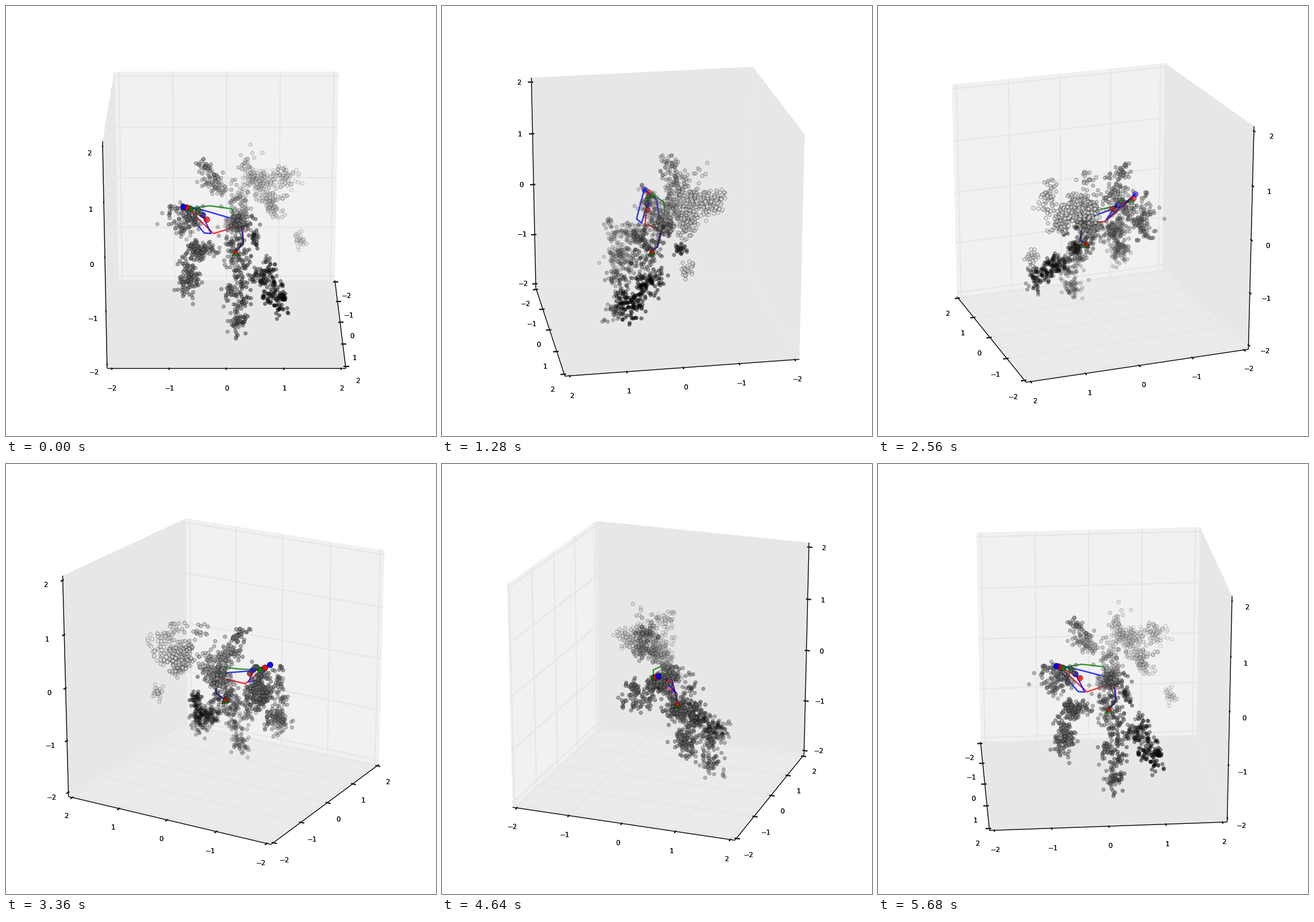
A matplotlib script that plays this animation: 748x748 px, repeating every 5.76 s.

```python
import numpy as np
import matplotlib
import matplotlib.pyplot as plt
from matplotlib.animation import FuncAnimation
from matplotlib.collections import LineCollection

matplotlib.rcParams["font.family"] = "DejaVu Sans"

SIZE, FRAMES, INTERVAL = 748, 72, 80
DIST, ELEV = 10.0, np.radians(20)
CENTER, SCALE = (383.5, 364.3), 3862
PX = 0.72                     # one pixel in points at 100 dpi
EDGE = 2 + 1 / 12             # panes lie just outside the -2..2 limits
DELTA = 1 / 3
TICKS = (-2, -1, 0, 1, 2)
TONE = .905                   # gray of the y pane and the grid

# The cloud gathers around chains of key points, in units of the cube's side.
BALL = (0, .056, -.02)
CANOPY = [
    [(-.11, .07, .25), (-.05, .03, .09), BALL],
    [(-.10, .28, .17), (-.19, .31, .11), (-.22, .12, .10),
     (-.12, .15, .15), (-.08, .20, .03)],
    [(-.03, -.13, .21), (-.06, -.05, .11)],
    [(-.055, .333, -.139)],
]
GROUND = [
    [(0, -.23, .01), (.04, -.15, .015), (-.06, -.19, -.06),
     (.08, -.10, -.14), (.18, -.145, -.09), (.17, -.165, -.25)],
    [BALL, (.04, .05, -.11), (.10, .06, -.20), (.22, .03, -.285),
     (.22, .04, -.43), (.21, .22, -.35), (.10, .185, -.255)],
    [(-.052, .146, -.116)],
]

START, RISE = (.057, .040, -.154), (.036, .076, -.120)
COLORS = {"green": (0, .5, 0), "red": (1, 0, 0), "blue": (0, 0, 1)}


def along(base, step, k):
    return tuple(np.array(base) + k * np.array(step))


TIP = {c: along((.034, -.179, .051), (.016, -.016, .010), k)
       for c, k in zip(("green", "red", "blue"), (-1, 0, 1))}
GOAL = {c: along((.050, -.108, .021), (-.005, -.019, .020), k)
        for c, k in zip(("red", "blue", "green"), (-1, 0, 1))}
PATHS = {
    "green": [START, RISE, (-.007, .025, .029), (-.017, -.074, .040),
              TIP["green"], GOAL["green"]],
    "red": [START, RISE, (.016, .074, -.050), (.036, .035, -.043),
            (.070, -.058, -.061), TIP["red"], GOAL["red"]],
    "blue": [START, RISE, (.015, .066, -.035), (.018, .030, -.010),
             (.006, -.120, .032), TIP["blue"], (.102, -.100, -.046),
             (.084, -.069, -.056), GOAL["blue"]],
}


def scatter_chain(rng, keys):
    """Clumpy points that thin out from each key towards the next."""
    keys = np.array(keys, float)
    count = 75 * len(keys) - 45
    spread = .034 if len(keys) > 1 else .020
    clumps = count // 7 + 1
    k = rng.integers(0, len(keys), clumps)
    ahead = np.minimum(k + 1, len(keys) - 1)
    t = rng.random((clumps, 1)) ** 2.5
    seeds = keys[k] + t * (keys[ahead] - keys[k])
    seeds += rng.normal(0, spread * .75, (clumps, 3))
    pick = rng.integers(0, clumps, count)
    return seeds[pick] + rng.normal(0, spread * .5, (count, 3))


def make_cloud():
    rng = np.random.default_rng(4)
    canopy = np.vstack([scatter_chain(rng, keys) for keys in CANOPY])
    ground = np.vstack([scatter_chain(rng, keys) for keys in GROUND])
    light = np.clip(.5 - canopy[:, 0] + .9 * canopy[:, 1], .42, .97)
    dark = np.clip(.38 - 1.8 * np.maximum(ground[:, 1], 0), .02, 1)
    return np.vstack([canopy, ground]), np.concatenate([light, dark])


def project(points, azim):
    """Perspective view of cube-unit points: pixel positions and depth."""
    x, y, z = np.asarray(points, float).T
    right = y * np.cos(azim) - x * np.sin(azim)
    toward = x * np.cos(azim) + y * np.sin(azim)
    up = z * np.cos(ELEV) - toward * np.sin(ELEV)
    depth = DIST - toward * np.cos(ELEV) - z * np.sin(ELEV)
    xy = np.column_stack([CENTER[0] + SCALE * right / depth,
                          CENTER[1] - SCALE * up / depth])
    return xy, depth


def place(data, azim):
    return project(np.asarray(data, float) / 4, azim)[0]


def pane_shades(azim):
    """Grays of the x, y and z panes; they even out when seen edge-on."""
    c, s = abs(np.cos(azim)), abs(np.sin(azim))
    facing, oblique = np.clip((np.array([c, min(c, s)]) - .26) / .08, 0, 1)
    return TONE + .042 * facing, TONE, TONE + .018 * oblique


def with_value(point, index, value):
    out = np.array(point, float)
    out[index] = value
    return out


CLOUD, GRAYS = make_cloud()

fig = plt.figure(figsize=(SIZE / 100, SIZE / 100), dpi=100, facecolor="white")
ax = fig.add_axes([0, 0, 1, 1])
ax.set_xlim(0, SIZE)
ax.set_ylim(SIZE, 0)
ax.axis("off")

panes = [ax.fill([0, 1, 1, 0], [0, 0, 1, 1], lw=0, zorder=0)[0] for _ in range(3)]


def add_segments(color, width, zorder):
    lines = LineCollection([], colors=color, linewidths=width * PX, zorder=zorder)
    ax.add_collection(lines)
    return lines


def add_marker(name, shape, size, zorder):
    return ax.plot([], [], shape, color=COLORS[name], ms=size * PX,
                   mec="black", mew=.6 * PX, zorder=zorder)[0]


grid = add_segments(str(TONE), 2.6, 1)
spines = add_segments("black", 1.4, 2)
ticks = add_segments("0.1", 2.3, 2)
# labels are drawn twice, which gives them their heavier look
labels = [[ax.text(0, 0, str(t).replace("-", "\u2212"), fontsize=11.8 * PX,
                   ha="center", va="center", zorder=2) for t in TICKS * 2]
          for _ in range(3)]

paths = {c: ax.plot([], [], color=COLORS[c], lw=2.4 * PX, alpha=.8, zorder=3)[0]
         for c in PATHS}
dots = ax.scatter(CLOUD[:, 0], CLOUD[:, 1], s=20, lw=.6 * PX, zorder=4)
tips = {c: add_marker(c, "o", 10, 5) for c in COLORS}
goals = {c: add_marker(c, "o", 10, 3.5) for c in COLORS}
starts = [add_marker("green", "^", 12, 4.5), add_marker("red", "^", 9, 4.6)]


def draw_box(azim):
    high = np.array([np.cos(azim) < -1e-9, np.sin(azim) < -1e-9, False])
    far = np.where(high, EDGE, -EDGE)

    for i, shade in enumerate(pane_shades(azim)):
        a, b = [k for k in range(3) if k != i]
        corners = []
        for p, q in ((1, 1), (-1, 1), (-1, -1), (1, -1)):
            corner = far.copy()
            corner[a] *= p
            corner[b] *= q
            corners.append(corner)
        panes[i].set_xy(place(corners, azim))
        panes[i].set_facecolor(str(shade))

    grid_lines, spine_lines, tick_lines = [], [], []
    for i in range(3):
        flip, other = ((1, 2), (0, 2), (0, 1))[i]
        edge = with_value(far, flip, -far[flip])
        spine_lines.append(place([edge, with_value(edge, i, -far[i])], azim))
        sign = 1 if high[flip] else -1
        for k, t in enumerate(TICKS):
            base = with_value(edge, i, t)
            corner = with_value(far, i, t)
            end = with_value(corner, other, -far[other])
            grid_lines.append(place([base, corner, end], azim))
            inner = with_value(base, flip, base[flip] + .1 * sign * DELTA)
            outer = with_value(base, flip, base[flip] - .2 * sign * DELTA)
            tick_lines.append(place([inner, outer], azim))
            spot = with_value(base + .65 * DELTA * np.sign(base), i, t)
            x, y = place([spot], azim)[0]
            for text in (labels[i][k], labels[i][k + len(TICKS)]):
                text.set_position((x + .5, y + 6))

    grid.set_segments(grid_lines)
    spines.set_segments(spine_lines)
    ticks.set_segments(tick_lines)


def draw_cloud(azim):
    xy, depth = project(CLOUD, azim)
    order = np.argsort(-depth)
    near = (depth.max() - depth) / np.ptp(depth)
    face = np.column_stack([GRAYS, GRAYS, GRAYS, .65 * (.3 + .7 * near)])[order]
    rim = face * (0, 0, 0, 1)
    dots.set_offsets(xy[order])
    dots.set_facecolors(face)
    dots.set_edgecolors(rim)


def draw_paths(azim):
    for c, points in PATHS.items():
        paths[c].set_data(*project(points, azim)[0].T)
        x, y, _ = TIP[c]
        front = x * np.cos(azim) + y * np.sin(azim) > 0
        tips[c].set_data(*project([TIP[c]], azim)[0].T)
        tips[c].set_alpha(.95 if front else .6)
        tips[c].set_zorder(5 if front else 3.5)
        goals[c].set_data(*project([GOAL[c]], azim)[0].T)
        goals[c].set_alpha(.75)
    x, y = project([START], azim)[0][0]
    for marker, lift in zip(starts, (0, 2)):
        marker.set_data([x], [y - lift])
        marker.set_alpha(.75)


def update(i):
    azim = np.radians(360 * i / FRAMES)
    draw_box(azim)
    draw_cloud(azim)
    draw_paths(azim)
    return []


anim = FuncAnimation(fig, update, frames=FRAMES, interval=INTERVAL,
                     repeat=True, repeat_delay=0, blit=False)
plt.show()
```
